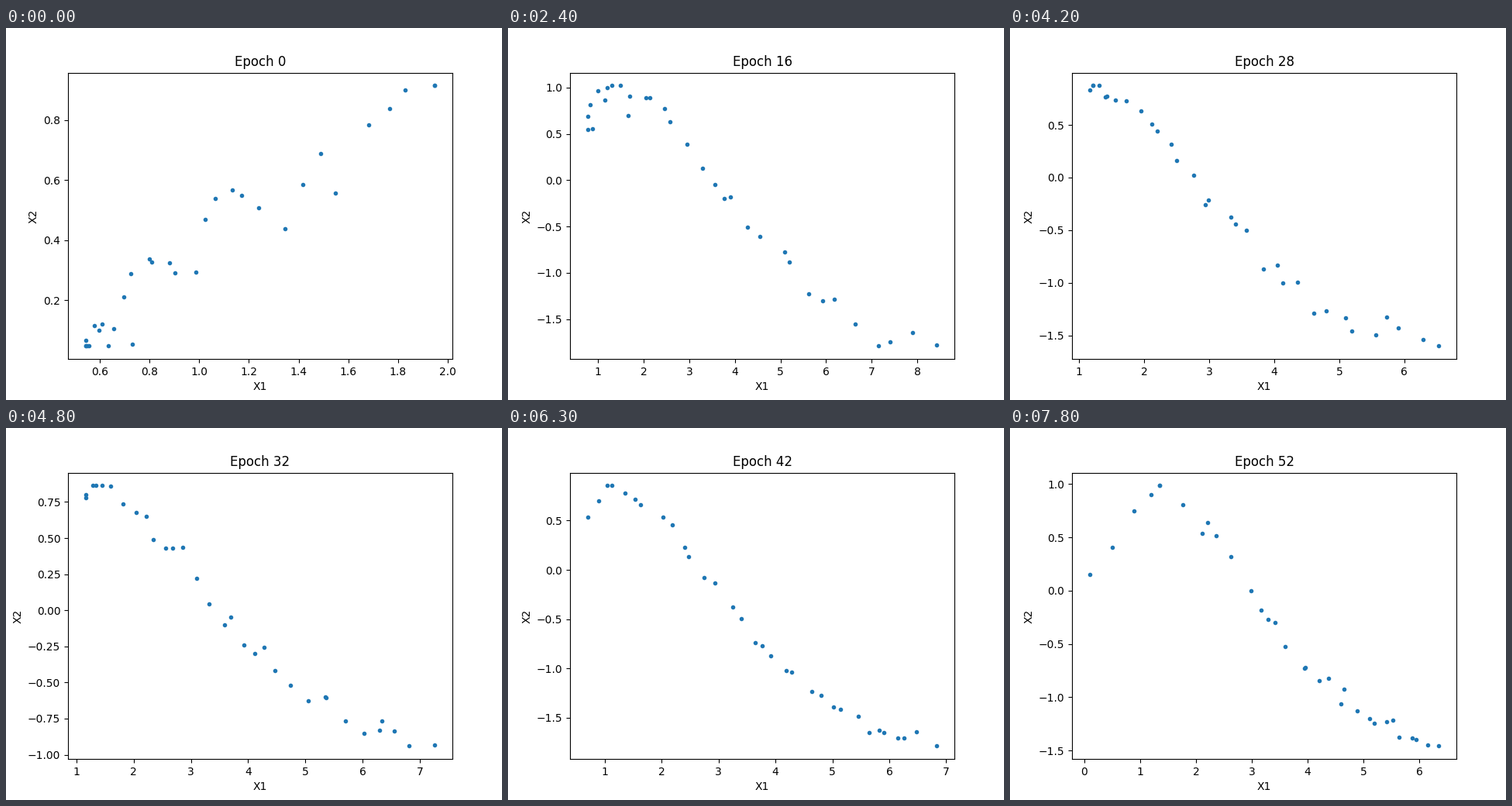
Animation of 640x480 px, one loop 8 s. Source, as a matplotlib script:

```python
import matplotlib.pyplot as plt
import numpy as np
from matplotlib.animation import FuncAnimation

BATCH = 32
TICK_MS = 100
TICKS_PER_STEP = 3
EPOCHS_PER_STEP = 2

# How the cloud's extent and the place of its peak drift with training:
# epoch, left, right, bottom, top, peak (as a share of the width)
MILESTONES = np.array([
    (0, .542, 1.949, .048, .915, 1),
    (8, .821, 6.814, -1.453, 1.148, .17),
    (16, .770, 8.430, -1.790, 1.020, .07),
    (28, 1.162, 6.530, -1.602, .873, .01),
    (32, 1.157, 7.266, -.940, .863, .02),
    (42, .695, 6.837, -1.790, .855, .07),
    (52, .092, 6.354, -1.459, .986, .20),
])


def curve(u, peak):
    """Straight rise to the peak, then a bell-shaped fall with a linear tail."""
    rise = np.interp(u, [0, peak], [max(0, 1 - 1.7 * peak), 1])
    t = np.clip((u - peak) / max(1 - peak, .01), 0, 1)
    fall = .7 * np.exp(-(t / .43) ** 2) + .3 * (1 - t)
    return rise * fall


def samples(epoch):
    """A fresh noisy batch along the curve, scaled to the epoch's extent."""
    left, right, bottom, top, peak = (
        np.interp(epoch, MILESTONES[:, 0], column)
        for column in MILESTONES[:, 1:].T)
    rng = np.random.default_rng(epoch)
    anchors = [0, peak, 1]
    count = BATCH - len(anchors)
    # Points gather on the left at first and move right with training.
    share = (np.arange(count) + rng.random(count)) / (count + 1)
    u = share ** (2 - .025 * epoch)
    noise = rng.normal(0, .02 + .08 * np.exp(-epoch / 12), count)
    v = np.clip(curve(u, peak) + noise, 0, 1)

    u = np.append(u, anchors)
    v = np.append(v, curve(np.array(anchors), peak))
    v = (v - v.min()) / np.ptp(v)
    return left + u * (right - left), bottom + v * (top - bottom)


fig, ax = plt.subplots(figsize=(6.4, 4.8), dpi=100)


def draw(tick):
    epoch = tick // TICKS_PER_STEP * EPOCHS_PER_STEP
    ax.clear()
    ax.plot(*samples(epoch), ".")
    ax.set(title=f"Epoch {epoch}", xlabel="X1", ylabel="X2")


anim = FuncAnimation(fig, draw, frames=80, init_func=lambda: None,
                     interval=TICK_MS, repeat=True, repeat_delay=0)
plt.show()
```
